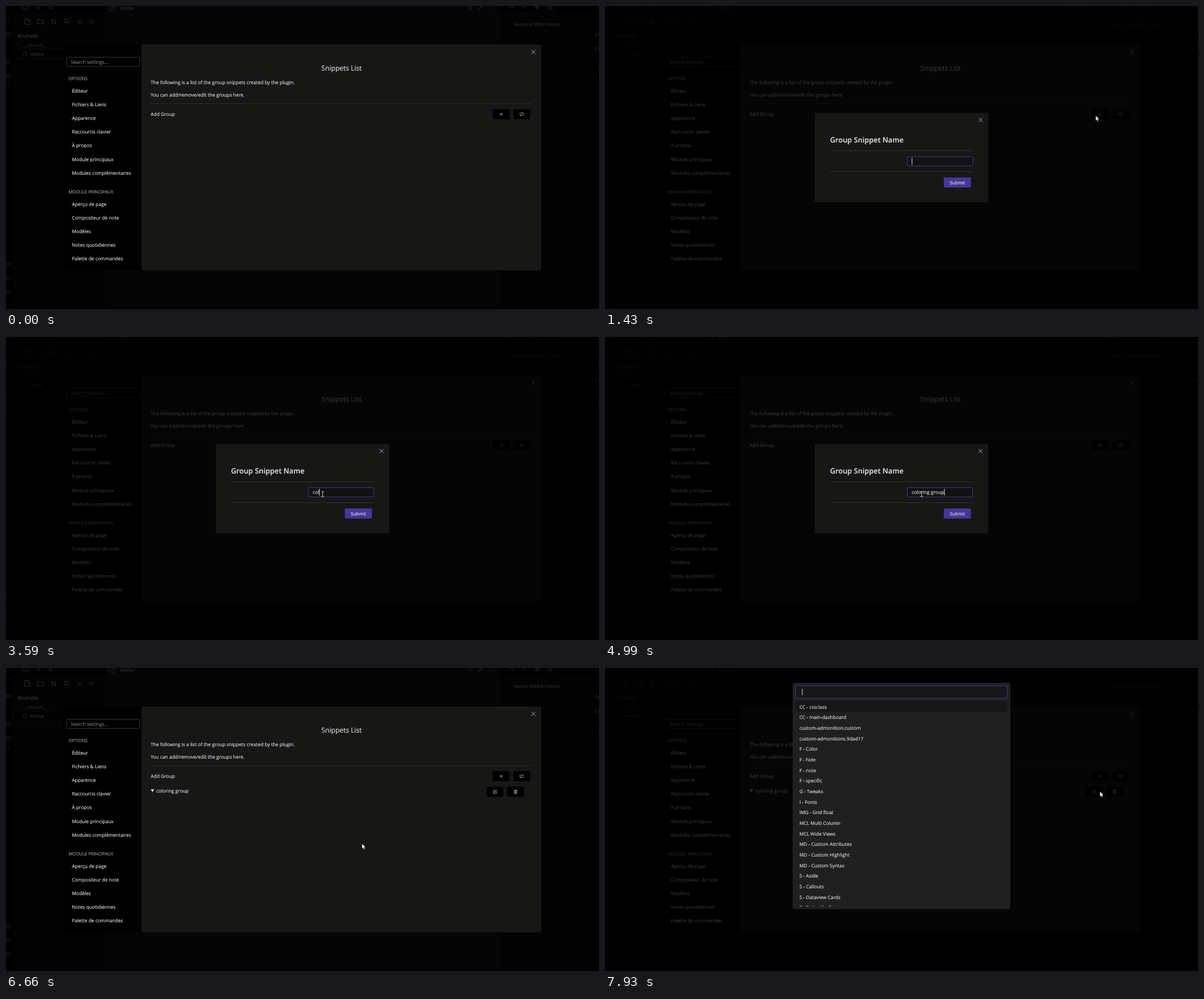
Recreate the animation shown at these times as an HTML page. Size 1046x535 px, loop 8 s.

```html
<!DOCTYPE html>
<html lang="fr">
<head>
<meta charset="utf-8">
<title>Snippet groups</title>
<style>
  html, body { margin: 0; width: 100%; height: 100%; overflow: hidden; background: #000; }
  svg { display: block; width: 100vw; height: 100vh; }
  text { font-family: "Open Sans", "Noto Sans", sans-serif; font-size: 8.43px; color: #dcddde;
         fill: currentColor; stroke: currentColor; stroke-width: .16px;
         white-space: pre; text-rendering: geometricPrecision; }
  .mid { text-anchor: middle; }
  .line { fill: none; stroke: currentColor; stroke-width: 1; stroke-linecap: round; stroke-linejoin: round; }
</style>
</head>
<body>
<svg id="stage" viewBox="0 0 1046 535" preserveAspectRatio="none" xmlns="http://www.w3.org/2000/svg"></svg>
<script>
const LOOP = 8000;
const PANEL = '#171716', ACCENT = '#483699';

// ---- markup helpers ----
const rect = (x, y, w, h, fill, extra = '') =>
  `<rect x="${x}" y="${y}" width="${w}" height="${h}" fill="${fill}" ${extra}/>`;
const text = (x, y, s, extra = '') =>
  `<text x="${x}" y="${y + 3}" ${extra}>${s.replace(/&/g, '&amp;')}</text>`;
const icon = (name, x, y, color, size = 1) =>
  `<path class="line" d="${ICONS[name]}" color="${color}" transform="translate(${x} ${y}) scale(${size})"/>`;
const group = (id, body) => `<g id="${id}">${body}</g>`;
const hline = (x, y, w, fill) => rect(x, y, w, 1, fill);
const button = (x, y, name) =>
  rect(x, y, 29.7, 17.7, '#000', 'rx="2"') + icon(name, x + 14.9, y + 8.8, '#c4c5c6', .72);

const ICONS = {
  plus: 'M-3.5 0H3.5M0-3.5V3.5',
  cross: 'M-3.3-3.3L3.3 3.3M3.3-3.3L-3.3 3.3',
  swap: 'M-4.6 1V-1.2Q-4.6-2.8-3-2.8H3.2M1.6-4.6L3.4-2.8L1.6-1M4.6-1V1.2Q4.6 2.8 3 2.8H-3.2M-1.6 1L-3.4 2.8L-1.6 4.6',
  edit: 'M0-3.6H-4V4.2H3.8V.4M-1.4 1.4L-1-.6L3.2-4.6L4.6-3.2L.5 1Z',
  trash: 'M-4-3H4M-1.4-3V-4.4H1.4V-3M-3-3V4.4H3V-3M-1-1V2.6M1-1V2.6',
  doc: 'M-4-5H1L4-2V5H-4ZM1-5V-2H4',
  folder: 'M-5-4H-1L0-2.5H5V4H-5Z',
  sort: 'M-2.5 4V-4M-4.5-2L-2.5-4L-.5-2M2.5-4V4M.5 2L2.5 4L4.5 2',
  search: 'M2-1A3.3 3.3 0 1 1-4.6-1A3.3 3.3 0 1 1 2-1M1.2 1.6L4.5 5',
  down: 'M-3.5-3L0 0L3.5-3M-3.5 0L0 3.5L3.5 0',
  eye: 'M-4.5 0Q0-5.5 4.5 0Q0 5.5-4.5 0M-1 0H1',
  star: 'M0-4L1.2-1.2L4-1L1.8 1L2.6 4L0 2.3L-2.6 4L-1.8 1L-4-1L-1.2-1.2Z',
  pencil: 'M-4 4L-3 1L3-4L4.4-2.6L-1.5 3Z',
  dots: 'M0-3V-2.8M0 0V.2M0 3V3.2',
  link: 'M-4 2L-1-2L1 0L4 3M1-3L4 0',
  hash: 'M-1-4L-2 4M2-4L1 4M-4-1.5H4M-4 1.5H4',
  list: 'M-4-3H4M-4 0H4M-4 3H4',
  round: 'M4 0A4 4 0 1 1-4 0A4 4 0 1 1 4 0M0-1.5V1.5',
  box: 'M-4-3H4V3H-4ZM-4 0H4',
  tick: 'M-2-1.5L0 1L2-1.5'
};

// ---- dimmed workspace ----
const row = (names, xs, y, color, size) =>
  names.split(' ').map((n, i) => icon(n, xs[i], y, color, size)).join('');

function workspace() {
  return rect(0, 0, 1046, 535, '#000') +
    rect(12, 11, 164, 520, '#030303') +
    rect(22, 0, 24, 11, '#030303') +
    rect(176, 0, 694, 531, '#050505') +
    rect(870, 11, 165, 520, '#030303') +
    rect(948, 0, 23, 11, '#030303') +
    rect(12.5, 76.5, 163, 16, '#000', 'stroke="#0a0816"') +
    row('folder search star', [34, 57, 79], 2, '#282828', .9) +
    row('doc folder sort search down eye', [38, 61, 84, 107, 130, 151], 27.5, '#2c2c2c', 1) +
    row('doc cross pencil dots', [187, 818, 836, 854], 3.5, '#272727', .9) +
    row('link link hash list', [892, 914, 937, 959], 2, '#272727', .9) +
    text(201, 3.5, 'Home', 'style="color:#303030;font-size:8.8px"') +
    text(21, 52.5, 'Brumelle', 'style="color:#383838"') +
    text(29.5, 68.5, '__setund__', 'style="color:#242424"') +
    icon('tick', 22, 68.5, '#242424', .8) +
    icon('doc', 34, 85, '#2c2c2c', .65) +
    text(42.5, 85, 'Home', 'style="color:#343434"') +
    text(896, 32, 'Aucun entête trouvé.', 'style="color:#2e2e2e"') +
    [['tick', 21], ['box', 50], ['round', 99], ['box', 124], ['tick', 142], ['box', 457], ['round', 481], ['round', 505]]
      .map(([n, y]) => icon(n, 4, y, '#202020', .9)).join('') +
    [['star', 51], ['box', 76], ['tick', 117]].map(([n, y]) => icon(n, 1042, y, '#202020', .9)).join('');
}

// ---- settings window ----
const OPTIONS = ['Éditeur', 'Fichiers & Liens', 'Apparence', 'Raccourcis clavier', 'À propos',
  'Module principaux', 'Modules complémentaires'];
const MODULES = ['Aperçu de page', 'Compositeur de note', 'Modèles', 'Notes quotidiennes', 'Palette de commandes'];
const menu = (items, y) => items.map((s, i) => text(116.2, y + i * 24.17, s)).join('');
const heading = (y, s) => text(110.3, y - .2, s, 'style="color:#999;font-size:7.8px"');

function settings() {
  return rect(100, 68, 139, 398.7, '#000') +
    rect(239, 68, 705, 398.7, PANEL) +
    rect(106.5, 90.5, 129, 16, '#000', 'rx="2" stroke="#333"') +
    text(114.3, 99, 'Search settings...', 'style="color:#757575"') +
    heading(127.7, 'OPTIONS') + menu(OPTIONS, 149.7) +
    heading(327.7, 'MODULE PRINCIPAUX') + menu(MODULES, 349.8) +
    icon('cross', 930.3, 81, '#bcbdbe', .95) +
    text(592, 111, 'Snippets List', 'class="mid" style="font-size:12.1px"') +
    text(255.2, 134.8, 'The following is a list of the group snippets created by the plugin.') +
    text(255.2, 156.9, 'You can add/remove/edit the groups here.') +
    hline(255, 172, 672, '#2c2c2b') +
    text(255.2, 191.3, 'Add Group') +
    button(858.6, 182.2, 'plus') + button(894.8, 182.2, 'swap') +
    group('groupRow',
      '<path d="M255.3 214h6.2l-3.1 5.6z" fill="#dcddde"/>' +
      text(265, 216.9, 'coloring group') +
      button(847.7, 209.8, 'edit') + button(883.9, 209.8, 'trash')) +
    group('tip',
      rect(836.5, 204.3, 74.5, 16.8, '#000', 'rx="3"') +
      text(873.5, 212.6, 'Add a new group', 'class="mid" style="font-size:7.6px"'));
}

// ---- name dialog ----
function dialog() {
  return rect(370, 188.7, 306, 158, PANEL) +
    icon('cross', 662.3, 201.3, '#bcbdbe', .95) +
    text(397, 238.2, 'Group Snippet Name', 'style="font-size:12.85px;font-weight:600"') +
    hline(397, 255, 252, '#313130') + hline(397, 292, 252, '#313130') +
    rect(533.2, 266, 115.4, 16.3, '#121212', 'id="field" rx="2"') +
    text(541, 274.2, '', 'id="typed"') +
    rect(541, 268, 1, 12, '#dcddde', 'id="caret"') +
    rect(597.7, 302.8, 47.8, 17.8, ACCENT, 'id="submit" rx="2"') +
    text(621.5, 311.6, 'Submit', 'class="mid" style="font-size:8px"');
}

// ---- suggestion list ----
const SNIPPETS = ['CC - cssclass', 'CC - main-dashboard', 'custom-admonition.custom', 'custom-admonitions.9dad17',
  'F - Color', 'F - hide', 'F - note', 'F - specific', 'G - Tweaks', 'I - Fonts', 'IMG - Grid float',
  'MCL Multi Column', 'MCL Wide Views', 'MD - Custom Attributes', 'MD - Custom Highlight', 'MD - Custom Syntax',
  'S - Aside', 'S - Callouts', 'S - Dataview Cards', 'S - Embed bullet'];

function suggest() {
  return rect(331, 26, 384, 399.7, '#202020', 'rx="4"') +
    rect(336.5, 31.3, 373, 22, PANEL, `rx="2" stroke="${ACCENT}"`) +
    rect(347.5, 37, 1, 11, '#dcddde') +
    rect(336, 58.7, 374, 18.7, '#161616') +
    '<clipPath id="view"><rect x="336" y="58" width="374" height="363"/></clipPath><g clip-path="url(#view)">' +
    SNIPPETS.map((s, i) => text(342.9, 68.5 + i * 18.68, s)).join('') + '</g>';
}

// ---- pointer ----
function pointers() {
  return '<circle id="press" r="7" fill="#b5a52c" opacity=".72"/>' +
    '<g id="pointer">' +
    '<path id="arrow" d="M0 0V9.3L2.1 7.4L3.5 10.6L5 9.9L3.6 6.8H6.4Z" fill="#fff" stroke="#000" stroke-width=".5"/>' +
    '<path id="beam" class="line" color="#c8c8c8" d="M-2-4.3H-.6L0-3.8L.6-4.3H2M0-3.8V3.8M-2 4.3H-.6L0 3.8L.6 4.3H2"/>' +
    '<path id="hand" d="M-.8 .8Q0-.6 .8 .8V4L4 4.8Q5.2 5.2 4.9 6.6L4 10.5H-.6L-3.2 7Q-3.2 5.6-.8 7Z" fill="#fff" stroke="#000" stroke-width=".4"/>' +
    '</g>';
}

const stage = document.getElementById('stage');
stage.innerHTML = workspace() + group('settings', settings()) +
  rect(0, 0, 1046, 535, '#000', 'id="shade" opacity=".78"') +
  group('dialog', dialog()) + group('suggest', suggest()) + pointers();
const $ = Object.fromEntries([...stage.querySelectorAll('[id]')].map(e => [e.id, e]));

// ---- timeline ----
// start, step length, step count, then the four points of a curve
const MOVES = [
  [380, 70, 12, [1020, 532], [955, 400], [890, 235], [846, 197]],
  [1220, 70, 1, [865.5, 193.5]],
  [1630, 90, 7, [865.5, 193.5], [560, 215], [420, 272], [557, 276]],
  [2370, 70, 3, [557, 276], [559, 279], [560, 278], [558.5, 277.5]],
  [6110, 70, 7, [558.5, 277.5], [570, 283], [605, 300], [626, 311]],
  [6660, 70, 1, [628, 310]],
  [6860, 66.7, 13, [628, 310], [800, 382], [1062, 225], [877, 224]],
  [7730, 70, 1, [873, 218]]
];
const KEYS = [[3330, 1], [3460, 2], [3590, 3], [3720, 4], [3850, 6], [3980, 7], [4050, 8], [4180, 9],
  [4450, 10], [4560, 11], [4670, 12], [4780, 13], [4990, 14]];
const CARET_OFF = [[1920, 2440], [2980, 3330], [5510, 6040]];
const PRESSES = [[1290, 1360], [6590, 6660], [7800, 7870]];

const within = (t, a, b) => t >= a && t < b;
const during = (t, spans) => spans.some(([a, b]) => within(t, a, b));
const show = (el, on) => { el.style.display = on ? '' : 'none'; };

function pointerAt(t) {
  const move = MOVES.filter(m => m[0] <= t).pop();
  if (!move) return null;
  const [start, step, count, a, b, c, d] = move;
  if (!b) return a;
  const k = Math.min(count, Math.floor((t - start) / step) + 1) / count;
  const u = k * k * (3 - 2 * k), v = 1 - u;
  return a.map((p, i) => v * v * v * p + 3 * v * v * u * b[i] + 3 * v * u * u * c[i] + u * u * u * d[i]);
}

function render(t) {
  const naming = within(t, 1430, 6660), picking = t >= 7930;
  show($.shade, naming || picking);
  show($.dialog, naming);
  show($.suggest, picking);
  show($.groupRow, t >= 6660);
  show($.tip, within(t, 1290, 1430));

  const at = pointerAt(t);
  show($.pointer, at);
  show($.press, at && during(t, PRESSES));
  if (at) {
    const [x, y] = at;
    const onField = naming && within(x, 533, 649) && within(y, 265, 283);
    const onSubmit = naming && within(x, 597, 646) && within(y, 302, 321);
    $.pointer.setAttribute('transform', `translate(${x} ${y})`);
    $.press.setAttribute('transform', `translate(${x - .7} ${y - .5})`);
    show($.beam, onField);
    show($.hand, onSubmit);
    show($.arrow, !onField && !onSubmit);
    $.submit.setAttribute('fill', onSubmit ? '#4d3ca6' : ACCENT);
  }

  if (naming) {
    const key = KEYS.filter(k => k[0] <= t).pop();
    const focus = t < 6590;
    $.typed.textContent = 'coloring group'.slice(0, key ? key[1] : 0);
    $.field.setAttribute('stroke', focus ? ACCENT : '#333');
    $.caret.setAttribute('x', 541 + (key ? $.typed.getComputedTextLength() : 0));
    show($.caret, focus && !during(t, CARET_OFF));
  }
}

const begin = performance.now();
function tick() {
  render((performance.now() - begin) % LOOP);
  requestAnimationFrame(tick);
}
tick();
</script>
</body>
</html>
```
